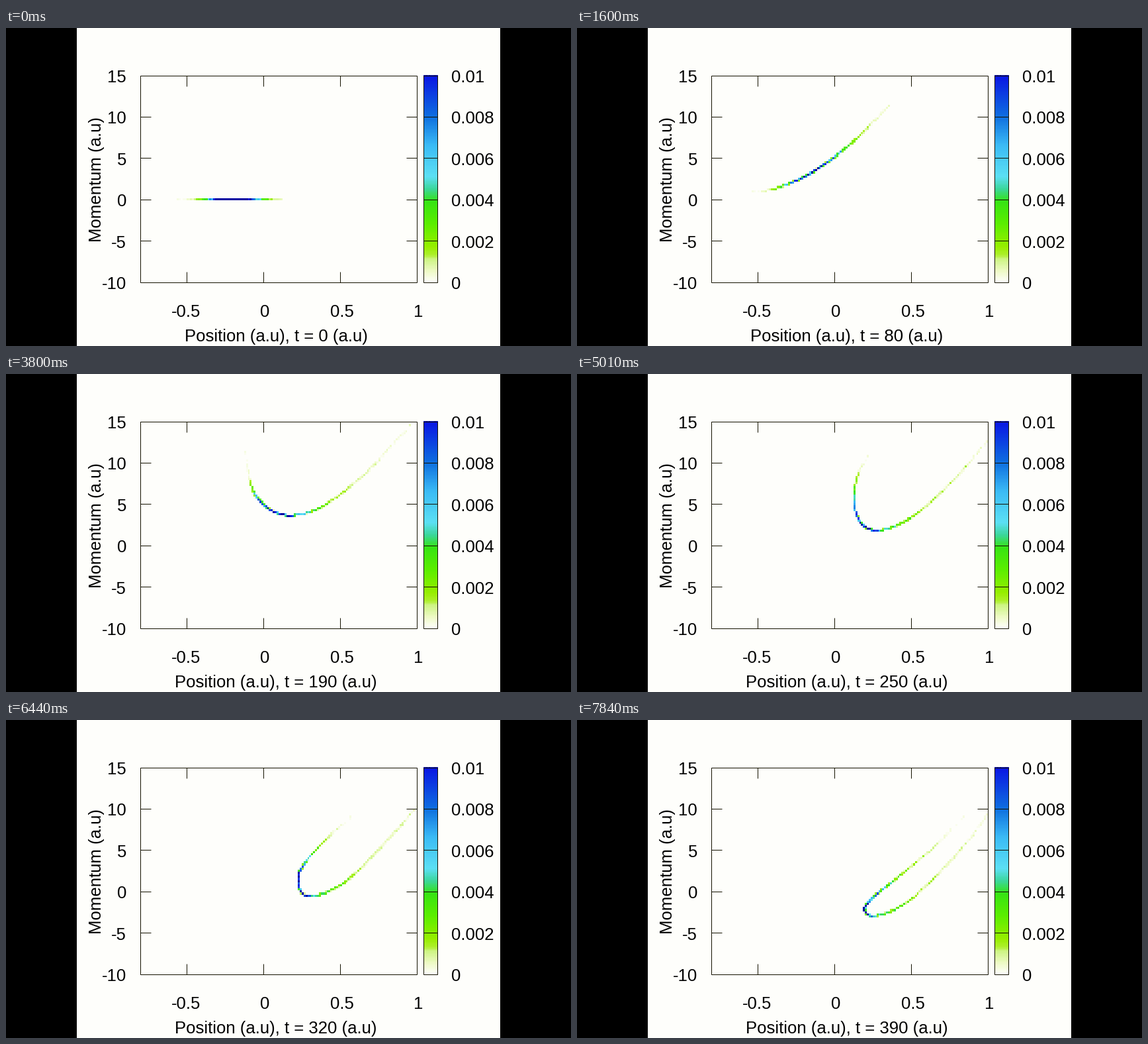
These frames come from a looping animation (854 px wide and 480 px high, 8 s). A matplotlib script:

```python
import numpy as np
import matplotlib.pyplot as plt
from matplotlib.animation import FuncAnimation
from matplotlib.colors import LinearSegmentedColormap
from matplotlib.patches import Rectangle

W, H, DPI = 854, 480, 100
FRAMES, INTERVAL = 40, 200
MASS = 1836
SAMPLES = 3000

LEFT, RIGHT, TOP, BOTTOM = 202.5, 620.5, 72.5, 384.5
X0, XS = 388.5, 232.0        # pixel of q = 0, pixels per unit of q
Y0, YS = 259.7, 12.5         # pixel of p = 0, pixels per unit of p
PAPER = "#fefefb"

plt.rcParams["font.family"] = "Liberation Sans"
plt.rcParams["font.size"] = 25.7 * 72 / DPI

# Landmarks of the swarm, labelled by starting distance from the mean in
# standard deviations, as (x, y) on the stage at a few times.
LABELS = np.array([-3.3, -2, -1.15, -0.36, 0, 0.38, 1.05, 1.8, 2.4, 2.8])
PATHS = {
    80: [(266, 248), (300, 243), (325, 234), (350, 222), (362, 214.5),
         (375, 206), (400, 187), (430, 161), (455, 135), (472, 119)],
    140: [(303, 154), (330, 186), (351, 199), (378, 205.4), (393, 205),
          (409, 202), (445, 186.5), (491, 157), (532, 121), (560, 94)],
    190: [(360, 119), (371, 170), (382, 191), (405, 209), (420, 214),
          (435, 214.5), (476, 202), (540, 154), (585, 107), (609, 80)],
    250: [(440, 124), (422, 160), (418, 195), (429, 226), (440, 234.5),
          (455, 237.5), (503, 219), (571, 159), (614, 110), (638, 85)],
    320: [(521, 148), (483, 182), (452, 216), (441, 244), (446, 261),
          (460, 267), (512, 245.5), (584, 174), (618, 135), (640, 108)],
    390: [(583, 148), (530, 201), (474, 247), (441, 275), (434.5, 287),
          (444, 296), (494, 279), (564, 214), (605, 165), (624, 138)],
}


def hermite(x, knots, vals, slopes):
    """Cubic Hermite curve through vals at knots, with given slopes."""
    x = np.asarray(x, float)
    i = np.clip(np.searchsorted(knots, x) - 1, 0, len(knots) - 2)
    h = knots[i + 1] - knots[i]
    u = (x - knots[i]) / h
    return ((1 + 2 * u) * (1 - u) ** 2 * vals[i]
            + u * (1 - u) ** 2 * h * slopes[i]
            + u * u * (3 - 2 * u) * vals[i + 1]
            + u * u * (u - 1) * h * slopes[i + 1])


# Positions and momenta of the landmarks, shape (times, labels)
times = np.array([0] + list(PATHS), float)
pts = np.array(list(PATHS.values()), float)
q_knots = np.vstack([-0.19 + 0.11 * LABELS, (pts[..., 0] - X0) / XS])
p_knots = np.vstack([0 * LABELS, (Y0 - pts[..., 1]) / YS])
q_rate = p_knots / MASS
p_rate = np.gradient(p_knots, times, axis=0)

rng = np.random.default_rng(7)
z = np.clip(rng.normal(size=SAMPLES), LABELS[0], LABELS[-1])

Q_EDGES = np.linspace(-0.8, 1, 145)
P_EDGES = np.linspace(-10.125, 15.125, 102)


def density(t):
    q = hermite(t, times, q_knots, q_rate)
    p = hermite(t, times, p_knots, p_rate)
    q, p = (hermite(z, LABELS, v, np.gradient(v, LABELS)) for v in (q, p))
    count = np.histogram2d(p, q, bins=(P_EDGES, Q_EDGES))[0]
    return np.ma.masked_equal(count * 0.364 / SAMPLES, 0)


STOPS = [(0, "#fefefa"), (0.05, "#effbc8"), (0.11, "#cdf583"),
         (0.13, "#aef02c"), (0.17, "#97ee00"), (0.28, "#5cee00"),
         (0.39, "#37e414"), (0.45, "#3cd79a"), (0.51, "#5ce0f4"),
         (0.66, "#3cbcf6"), (0.8, "#0f70e0"), (1, "#0a16e4")]
cmap = LinearSegmentedColormap.from_list("swarm", STOPS, N=256)
cmap.set_over("#0000a0")
cmap.set_bad((0, 0, 0, 0))

# The small margin keeps the pixel size from rounding down
fig = plt.figure(figsize=((W + 0.01) / DPI, (H + 0.01) / DPI), dpi=DPI,
                 facecolor="black")
ax = fig.add_axes([0, 0, 1, 1])
ax.axis("off")


def line(x1, y1, x2, y2):
    ax.plot([x1, x2], [y1, y2], color="#141200", lw=0.72, zorder=4,
            solid_capstyle="butt")


def frame(x1, y1, x2, y2):
    ax.add_patch(Rectangle((x1, y1), x2 - x1, y2 - y1, fill=False,
                           ec="#141200", lw=0.72, zorder=4))


def label(x, y, text, ha="center", **kw):
    return ax.text(x, y, text, ha=ha, va="baseline", color="black", **kw)


ax.add_patch(Rectangle((107, 0.5), 640, 480, color=PAPER, lw=0, zorder=0))

image = ax.imshow(density(0), cmap=cmap, vmin=0, vmax=0.01, origin="lower",
                  interpolation="nearest", aspect="auto", zorder=2,
                  extent=(X0 + XS * Q_EDGES[0], X0 + XS * Q_EDGES[-1],
                          Y0 - YS * P_EDGES[0], Y0 - YS * P_EDGES[-1]))
image.set_clip_path(Rectangle((LEFT, TOP), RIGHT - LEFT, BOTTOM - TOP,
                              transform=ax.transData))
frame(LEFT, TOP, RIGHT, BOTTOM)

for p in range(-10, 16, 5):
    y = round(Y0 - YS * p) - 0.5
    if -10 < p < 15:
        line(LEFT, y, LEFT + 16, y)
        line(RIGHT - 16, y, RIGHT, y)
    label(182, Y0 - YS * p + 9.5, str(p), "right")

for q in (-0.5, 0, 0.5, 1):
    x = X0 + XS * q
    if q < 1:
        line(x, TOP, x, TOP + 16)
        line(x, BOTTOM - 16, x, BOTTOM)
    label(x + 3 if q >= 0 else x - 0.5, 436, f"{q:g}")

# Colour scale
BAR_L, BAR_R = 630.5, 651.5
ax.imshow(np.linspace(0, 1, 256)[:, None], cmap=cmap, aspect="auto",
          vmin=0, vmax=1, extent=(BAR_L, BAR_R, BOTTOM, TOP),
          origin="lower", zorder=2)
frame(BAR_L, TOP, BAR_R, BOTTOM)
for k in range(6):
    y = BOTTOM - (BOTTOM - TOP) * k / 5
    if 0 < k < 5:
        line(BAR_L, round(y) - 0.5, BAR_R, round(y) - 0.5)
    label(673, y + 9.5, f"{0.002 * k:g}", "left")

label(144, 228, "Momentum (a.u)", rotation=90, rotation_mode="anchor")
caption = label(408, 473, "")

ax.set_xlim(0, W)
ax.set_ylim(H, 0)


def update(i):
    t = 10 * i
    image.set_data(density(t))
    caption.set_text(f"Position (a.u), t = {t} (a.u)")
    return image, caption


anim = FuncAnimation(fig, update, frames=FRAMES, interval=INTERVAL,
                     repeat=True, repeat_delay=0)
plt.show()
```
